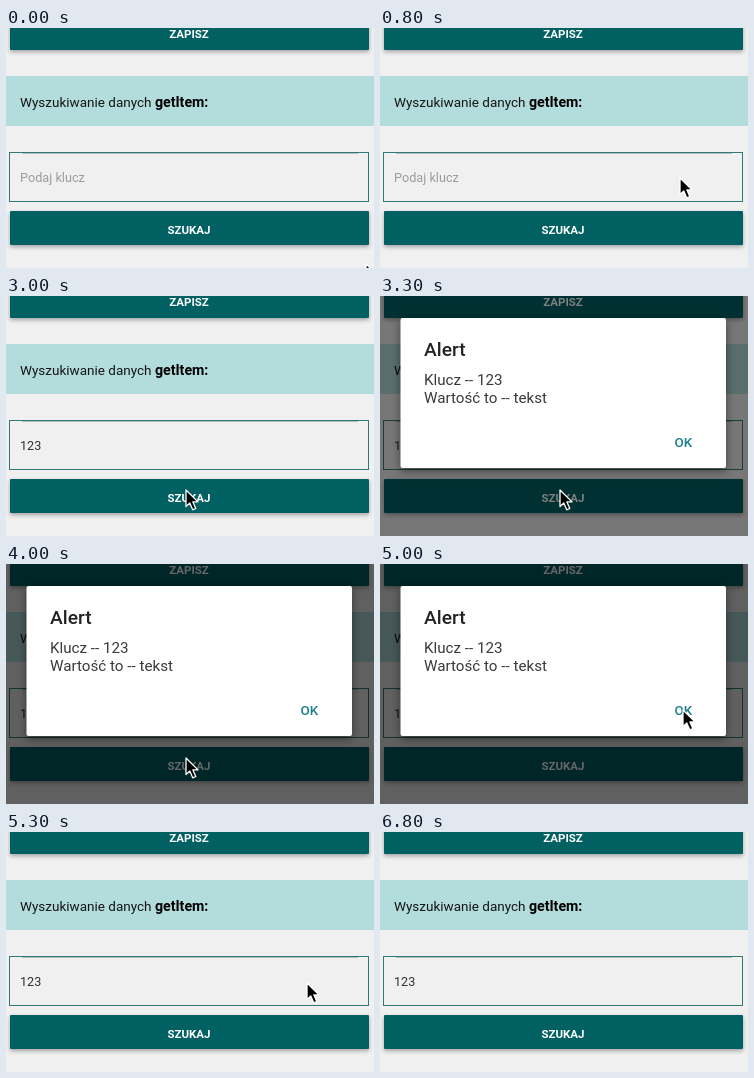
An HTML page that plays this animation: 368 by 240 pixels, repeating every 7.2 s.

```html
<!DOCTYPE html>
<html lang="pl">
<head>
<meta charset="utf-8">
<title>getItem</title>
<style>
  html, body { margin: 0; width: 100%; height: 100%; overflow: hidden; background: #f0f0f0; }
  svg { display: block; width: 368px; height: 240px; }
  text { font-family: Roboto, sans-serif; white-space: pre; }
  .btn { fill: #006062; filter: drop-shadow(0 2px 2px rgba(0, 0, 0, .32)); }
  .label { fill: #fff; font-size: 11.5px; font-weight: 700; text-anchor: middle; }
  .icon { fill: none; stroke: #5f6368; stroke-width: 1.8; stroke-linecap: round; stroke-linejoin: round; }
  .solid { fill: #5f6368; }
</style>
</head>
<body>
<svg viewBox="0 0 368 240">
  <rect width="368" height="240" fill="#f0f0f0"/>

  <rect class="btn" x="4" y="-12" width="359" height="34" rx="1"/>
  <text class="label" x="183" y="9.5">ZAPISZ</text>

  <rect y="48" width="368" height="50" fill="#b3dddc"/>
  <text x="14" y="79" font-size="13.5" fill="#151515">Wyszukiwanie danych <tspan font-size="14.2" font-weight="700" fill="#000">getItem:</tspan></text>

  <rect x="3.5" y="124.5" width="359" height="49" fill="#f0f0f0" stroke="#2f7a79"/>
  <path d="M16 125.5H352" stroke="#a3b0b0" stroke-width=".8"/>
  <text id="hint" x="14" y="154" font-size="12.7" fill="#9c9c9c">Podaj klucz</text>
  <text id="value" x="14" y="154" font-size="12.6" fill="#303030"></text>
  <rect id="caret" y="140" width="1.5" height="18" fill="#107a78"/>

  <rect class="btn" x="4" y="183" width="359" height="34" rx="1"/>
  <text class="label" x="183" y="205.5">SZUKAJ</text>

  <g id="keys">
    <rect y="203" width="368" height="60" fill="#e8eaef"/>
    <circle cx="20" cy="224" r="14" fill="#fff"/>
    <path class="icon" d="M22 219.5L17.5 224L22 228.5"/>
    <circle class="icon" cx="67.5" cy="222" r="5"/>
    <path class="icon" d="M71.5 226L76.5 231"/>
    <path class="icon" d="M117 216H129Q131 216 131 218V226L125 232H117Q115 232 115 230V218Q115 216 117 216ZM131 226H127Q125 226 125 228V232M119 225.5Q122 228.5 125.5 225"/>
    <circle class="solid" cx="120" cy="221" r="1.2"/>
    <circle class="solid" cx="126" cy="221" r="1.2"/>
    <text class="solid" x="176" y="228" font-size="12.5" font-weight="900" letter-spacing=".6" text-anchor="middle">GIF</text>
    <path class="icon" d="M225 217H237Q238 217 238 218V231Q238 232 237 232H225Q224 232 224 231V218Q224 217 225 217ZM228 222H234.500M228 225H234.500M228 228H232"/>
    <rect class="solid" x="227.500" y="214.500" width="7" height="4.500" rx="1"/>
    <path d="M264.500 213V235" stroke="#d3d6da"/>
    <circle class="solid" cx="291" cy="224" r="1.9"/>
    <circle class="solid" cx="297.300" cy="224" r="1.9"/>
    <circle class="solid" cx="303.600" cy="224" r="1.9"/>
    <rect class="solid" x="348" y="214" width="6" height="12" rx="3"/>
    <path class="icon" d="M345.500 223Q345.500 229 351 229T356.500 223M351 229V233"/>
  </g>

  <rect id="dim" width="368" height="240"/>
  <g id="alert">
    <rect x="20.5" y="22" width="325.5" height="150" rx="2" fill="#fff" style="filter: drop-shadow(0 3px 4px rgba(0, 0, 0, .45))"/>
    <text x="44" y="60" font-size="19.2" font-weight="500" fill="#222">Alert</text>
    <g font-size="15.2" fill="#3a3a3a">
      <text x="44" y="89">Klucz -- 123</text>
      <text x="44" y="107">Wartość to -- tekst</text>
    </g>
    <text x="294.5" y="151" font-size="13.4" font-weight="500" fill="#1a808a">OK</text>
  </g>

  <path id="mouse" d="M0 0V16.500L3.800 13L6.700 19.800L9.800 18.500L6.900 11.900H12Z" fill="#000" stroke="#fff" stroke-width="1.3" stroke-linejoin="round"/>
</svg>
<script>
  const LOOP = 7200, STEP = 100;
  const $ = id => document.getElementById(id);
  const hint = $("hint"), value = $("value"), caret = $("caret"), keys = $("keys"),
        dim = $("dim"), alertBox = $("alert"), mouse = $("mouse");

  // Each stop: time, then one or more values
  const route = [[0, 360, 236], [800, 300, 150], [1400, 300, 150], [1800, 295, 101],
    [1900, 295, 101], [2100, 180, 194], [4100, 180, 194], [4600, 303, 146],
    [5000, 303, 146], [5300, 301, 151], [5600, 301, 151], [6100, 306, -24]];
  const keysRise = [[800, 0], [1200, 1], [2500, 1], [2800, 0]];
  const alertFade = [[3000, 0], [3300, 1], [5000, 1], [5300, 0]];
  const dimFade = [[3000, 0], [3300, .5], [3500, .6], [5000, .6], [5300, 0]];
  const typed = [[1500, "1"], [1700, "12"], [1800, "123"]];

  const ease = p => p * p * (3 - 2 * p);

  function at(stops, t) {
    const i = stops.findIndex(s => s[0] > t);
    if (i < 0) return stops[stops.length - 1].slice(1);
    if (i === 0) return stops[0].slice(1);
    const a = stops[i - 1], b = stops[i];
    const p = ease((t - a[0]) / (b[0] - a[0]));
    return a.slice(1).map((v, k) => v + (b[k + 1] - v) * p);
  }

  function show(el, on) { el.style.display = on ? "" : "none"; }

  function draw(t) {
    const past = typed.filter(k => k[0] <= t);
    const [since, word] = past.length ? past[past.length - 1] : [900, ""];
    value.textContent = word;
    show(hint, !word);
    show(caret, t >= 900 && t < 2600 && (t - since) % 1000 < 500);
    caret.setAttribute("x", 14 + word.length * 7.1);

    const [rise] = at(keysRise, t);
    show(keys, rise > 0);
    keys.setAttribute("transform", `translate(0 ${37 * (1 - rise)})`);

    const [fade] = at(alertFade, t);
    dim.setAttribute("opacity", at(dimFade, t)[0]);
    alertBox.setAttribute("opacity", fade);

    const [x, y] = at(route, t);
    mouse.setAttribute("transform", `translate(${x} ${y})`);
  }

  const start = performance.now();
  function tick() {
    const t = Math.max(0, performance.now() - start) % LOOP;
    draw(Math.floor(t / STEP) * STEP);
    requestAnimationFrame(tick);
  }
  tick();
</script>
</body>
</html>
```
